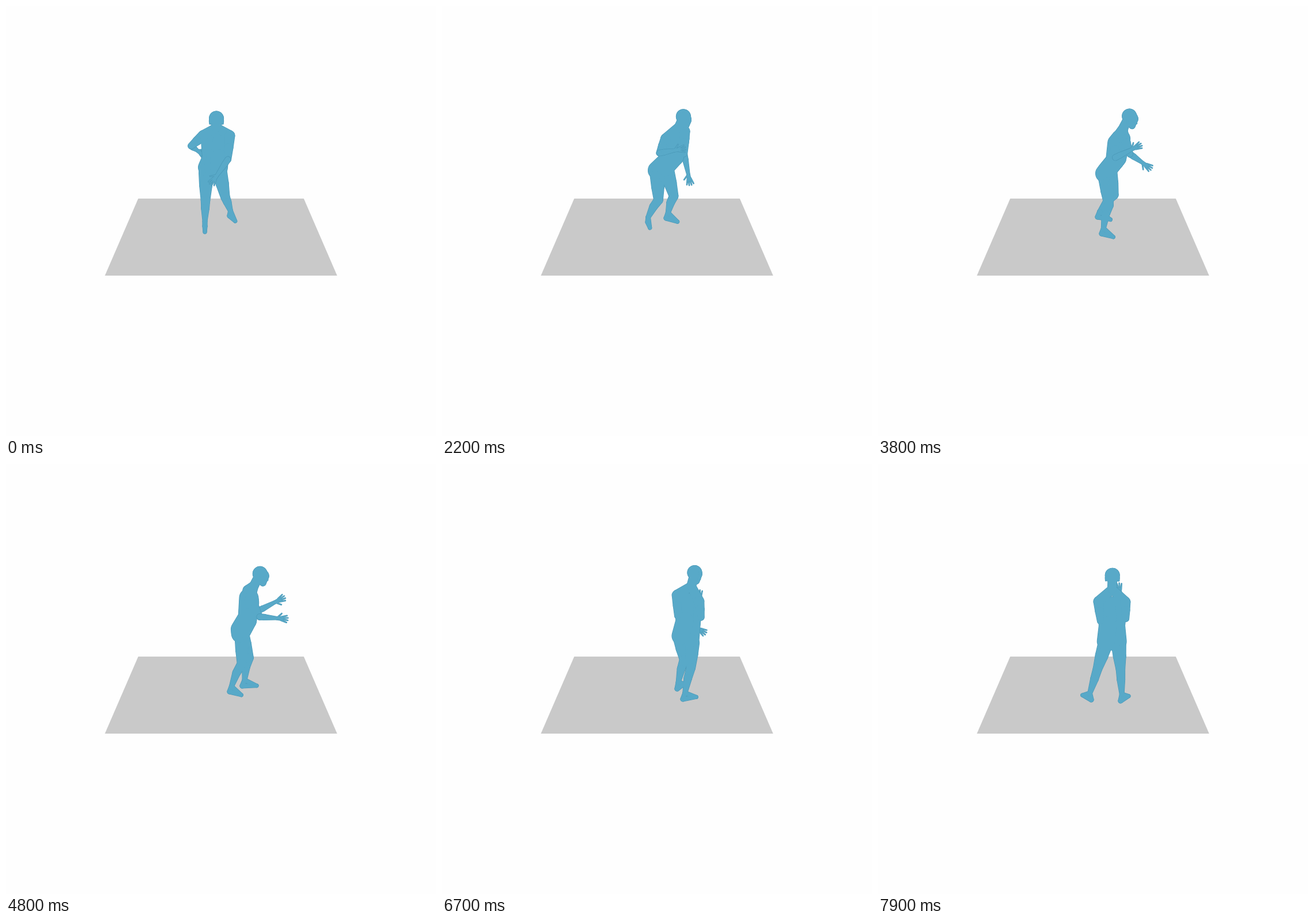
Write an HTML page with a canvas that moves like this. It is 748 px wide and 748 px high and loops after 8000 ms.

```html
<!DOCTYPE html>
<html lang="en">
<head>
<meta charset="utf-8">
<title>Turning figure</title>
<style>
  html, body { margin: 0; height: 100%; overflow: hidden; background: #fefefe; }
  canvas { display: block; }
</style>
</head>
<body>
<canvas id="stage" width="748" height="748"></canvas>
<script>
const ctx = document.getElementById('stage').getContext('2d');
const LOOP = 8000, STEP = 100;
const SKIN = '#58a9c8', EDGE = '#4a98b7', INSET = 0.7;
const TILT = 0.4; // how far depth moves a point down the stage
const { sin, cos, PI, hypot, max, min } = Math;

// Wrist paths beside, before and above the neck, at even times.
const RIGHT_WRIST = [[-33, 20, -32], [-30, 20, -37], [-30, 16, -15], [-30, 38, -46], [-5, 20, -35], [-14, 18, -15]];
const LEFT_WRIST = [[1, 25, -73], [3, 16, -76], [0, 30, -76], [0, 36, -30], [0, 16, -78], [-4, 16, -50]];

// Feet: heel x, y and turn, then steps of start, end and change.
const RIGHT_FOOT = {
  start: [346, 383, 0],
  steps: [[0, 0.28, 12, -7, 0.15], [0.3, 0.43, 31, 20, 0.8], [0.62, 0.8, 30, 13, 1], [0.84, 0.97, 3, 3, 0.6]]
};
const LEFT_FOOT = {
  start: [389, 365, 0.4],
  steps: [[0, 0.28, 1, 4, 0.5], [0.3, 0.42, -8, -2, 0.2], [0.5, 0.6, 29, 19, 0.5], [0.64, 0.8, -2, 5, 1], [0.85, 0.97, -38, 19, 1.2]]
};

const mix = (a, b, u) => a.map((v, i) => v + (b[i] - v) * u);

function smooth(from, to, u) {
  const v = min(1, max(0, (u - from) / (to - from)));
  return v * v * (3 - 2 * v);
}

// Curve through evenly spaced points.
function along(points, u) {
  const last = points.length - 1, i = min(last - 1, Math.floor(u * last)), v = u * last - i;
  const [a, b, c, d] = [-1, 0, 1, 2].map(k => points[min(last, max(0, i + k))]);
  return b.map((p, k) => p + v / 2 * (c[k] - a[k]
    + v * (2 * a[k] - 5 * p + 4 * c[k] - d[k] + v * (3 * (p - c[k]) + d[k] - a[k]))));
}

const depth = ([side, front], yaw) => front * cos(yaw) - side * sin(yaw);

const place = (from, at, yaw) => [
  from[0] + at[0] * cos(yaw) + at[1] * sin(yaw),
  from[1] - at[2] + TILT * depth(at, yaw)];

// Outline around two discs.
function capsule(p, q, r, s) {
  const path = new Path2D();
  const dist = hypot(q[0] - p[0], q[1] - p[1]);
  if (dist <= Math.abs(r - s)) {
    path.arc(...(r > s ? p : q), max(r, s), 0, 2 * PI);
    return path;
  }
  const a = Math.atan2(q[1] - p[1], q[0] - p[0]);
  const b = Math.acos((r - s) / dist);
  path.arc(...p, r, a + b, a - b + 2 * PI);
  path.arc(...q, s, a - b, a + b);
  path.closePath();
  return path;
}

const chain = (points, radii) =>
  points.slice(1).map((p, i) => capsule(points[i], p, radii[i] - INSET, radii[i + 1] - INSET));

function hand(elbow, wrist, side) {
  const angle = Math.atan2(wrist[1] - elbow[1], wrist[0] - elbow[0]);
  const reach = (turn, len) => [wrist[0] + len * cos(angle + turn), wrist[1] + len * sin(angle + turn)];
  const finger = (turn, from, to) => chain([reach(turn, from), reach(turn, to)], [1.8, 1.3]);
  return [
    ...chain([wrist, reach(0, 8)], [3.4, 3.7]),
    ...[-0.33, -0.11, 0.11, 0.33].flatMap(turn => finger(turn, 8, 20 - 5 * Math.abs(turn))),
    ...finger(0.85 * side, 2, 12)
  ];
}

function arm(neck, yaw, u, side, wristPath) {
  const wristAt = along(wristPath, u);
  const elbowAt = [
    side < 0 ? -44 + 20 * u : 20,
    0.9 * (wristAt[1] - 29),
    side < 0 ? -35 - 12 * u : -57 + 6 * u];
  const shoulder = place(neck, [side * 23, -10, -18], yaw);
  const elbow = place(neck, elbowAt, yaw), wrist = place(neck, wristAt, yaw);
  return {
    front: depth(wristAt, yaw) + depth(elbowAt, yaw) > 12,
    upper: [
      ...chain([neck, shoulder], [8, 9.5]),
      ...chain([shoulder, mix(shoulder, elbow, 0.5), elbow], [9.5, 8, 6])],
    lower: [
      ...chain([elbow, mix(elbow, wrist, 0.3), wrist], [5.8, 5.5, 3.3]),
      ...hand(elbow, wrist, side)]
  };
}

function leg(ground, yaw, u, side, { start, steps }) {
  const [x, y, turn] = steps.reduce((foot, [from, to, ...change]) =>
    foot.map((v, i) => v + change[i] * smooth(from, to, u)), start);
  const heel = [x, y], toe = place(heel, [0, 25, 0], turn), ankle = place(heel, [0, 4, 10], turn);
  const hip = place(ground, [side * 12, 0, 93], yaw);
  const bend = 5 + max(0, 92 - hypot(hip[0] - ankle[0], hip[1] - ankle[1])) / 2;
  const knee = place(mix(hip, ankle, 0.5), [0, bend, -2], yaw);
  const calf = place(mix(knee, ankle, 0.4), [0, -2, 0], yaw);
  return [
    ...chain([hip, mix(hip, knee, 0.45), knee, calf, ankle], [13, 11.5, 8.3, 7.4, 4.4]),
    ...chain([ankle, heel, toe], [4.4, 4.6, 3.6]),
    ...chain([ankle, toe], [4.4, 3.6])
  ];
}

function trunk(ground, neck, yaw) {
  return [-1, 0, 1].flatMap(side => {
    const chest = place(neck, [side * 10, -9, -26], yaw);
    const waist = place(mix(neck, ground, 0.32), [side * 7, -5, 0], yaw);
    const hips = place(ground, [side * 10, -3, 101], yaw);
    return chain([chest, waist, hips], [17, 16, 16]);
  });
}

function head(neck, yaw) {
  const skull = place(neck, [0, 10, 20], yaw);
  const face = place(skull, [0, 6, -4], yaw), chin = place(skull, [0, 5, -16], yaw);
  const nose = place(skull, [0, 13, -11], yaw);
  const ears = [-1, 1].flatMap(side =>
    chain([place(skull, [side * 11, 0, -4], yaw), place(skull, [side * 11, 0, -9], yaw)], [2.2, 1.8]));
  return [
    ...chain([skull, face, chin], [13, 10, 6]),
    ...chain([skull, chin], [13, 6]),
    ...chain([face, nose], [5, 1.8]),
    ...chain([skull, neck], [8, 8.5]),
    ...ears
  ];
}

function paint(shapes) {
  ctx.strokeStyle = EDGE;
  ctx.lineWidth = 2 * INSET;
  shapes.forEach(s => ctx.stroke(s));
  ctx.fillStyle = SKIN;
  shapes.forEach(s => ctx.fill(s));
}

function floor() {
  ctx.fillStyle = '#c9c9c9';
  ctx.beginPath();
  ctx.moveTo(230, 335);
  ctx.lineTo(518, 335);
  ctx.lineTo(576, 469);
  ctx.lineTo(172, 469);
  ctx.fill();
}

function draw(u) {
  ctx.fillStyle = '#fefefe';
  ctx.fillRect(0, 0, 748, 748);
  floor();

  // The body drifts right while it turns away, then swings back.
  const swell = sin(PI * u) ** 2;
  const yaw = PI * u - 0.5 * u * swell;
  const ground = [360 + 84 * u - 42 * u ** 12, 383 + 26 * u * u];
  const neck = place(ground, [(1 - u) * (6 + 22 * swell), 34 - 20 * u, 185 - 9 * swell], yaw);

  const arms = [arm(neck, yaw, u, 1, LEFT_WRIST), arm(neck, yaw, u, -1, RIGHT_WRIST)];
  arms.filter(a => !a.front).forEach(a => paint(a.lower));
  paint([
    ...leg(ground, yaw, u, 1, LEFT_FOOT),
    ...leg(ground, yaw, u, -1, RIGHT_FOOT),
    ...trunk(ground, neck, yaw),
    ...arms.flatMap(a => a.upper),
    ...head(neck, yaw)
  ]);
  arms.filter(a => a.front).forEach(a => paint(a.lower));
}

function tick() {
  const now = performance.now() % LOOP;
  draw(Math.floor(now / STEP) * STEP / LOOP);
  requestAnimationFrame(tick);
}
tick();
</script>
</body>
</html>
```
